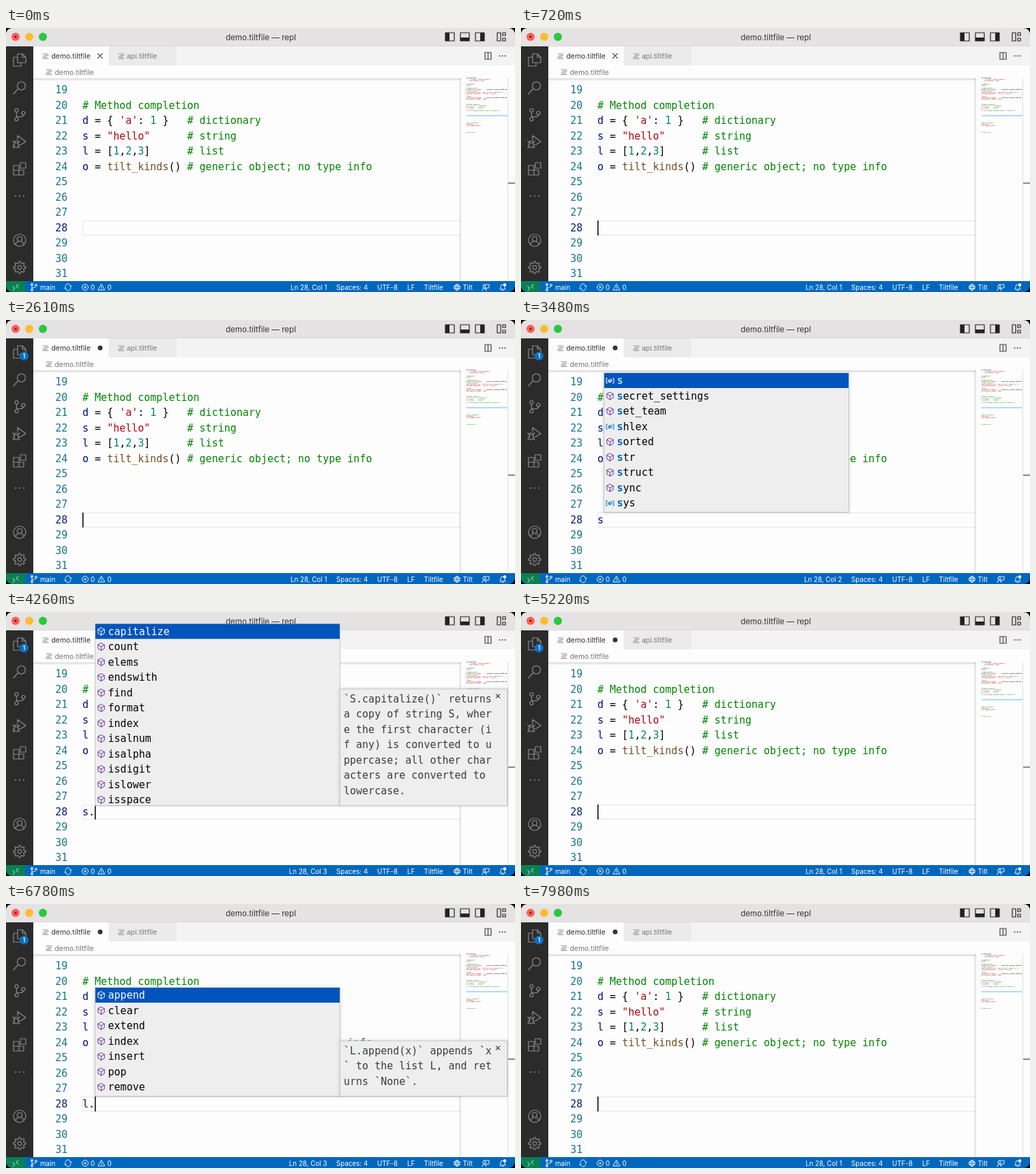
Write an HTML page that moves like this. It is 746 px wide and 388 px high and loops after 8 s.

```html
<!DOCTYPE html>
<html lang="en">
<head>
<meta charset="utf-8">
<title>Editor completion demo</title>
<style>
html, body { margin: 0; width: 100%; height: 100%; overflow: hidden; background: #000; }
svg { display: block; width: 746px; height: 388px; }
text { font: 10.4px Inter, sans-serif; white-space: pre; }
.code { font: 15px "DejaVu Sans Mono", monospace; }
.match { font-weight: bold; }
.mini { font: bold 1.7px "DejaVu Sans Mono", monospace; }
.status { font-size: 9.8px; fill: #fff; }
.title { font-size: 11.6px; fill: #333; text-anchor: middle; }
.end { text-anchor: end; }
.line { fill: none; stroke-width: 1.2; stroke-linejoin: round; stroke-linecap: round; }
</style>
</head>
<body>
<svg viewBox="0 0 746 388">
  <defs>
    <clipPath id="window"><rect width="746" height="388" rx="9"/></clipPath>
    <linearGradient id="fade" x2="0" y2="1"><stop stop-color="#000" stop-opacity=".15"/><stop offset="1" stop-color="#000" stop-opacity="0"/></linearGradient>
    <linearGradient id="side"><stop stop-color="#000" stop-opacity="0"/><stop offset="1" stop-color="#000" stop-opacity=".12"/></linearGradient>
    <filter id="shadow" x="-10%" y="-10%" width="120%" height="120%"><feDropShadow dx="0" dy="0" stdDeviation="2.5" flood-opacity=".16"/></filter>
  </defs>
  <g clip-path="url(#window)"><g id="base"></g><g id="live"></g></g>
</svg>
<script>
const LOOP = 8000, ROW = 22.5, CHAR = 9.03, CODE_X = 112, EDIT_LINE = 28;
const INK = "#000", GREEN = "#008500", RED = "#ad0a12", NUM = "#098658", NAME = "#001080", FUNC = "#735025";
const BLUE = "#0067bd", SELECTED = "#0054bb";

const rect = (x, y, w, h, fill, extra = "") => `<rect x="${x}" y="${y}" width="${w}" height="${h}" fill="${fill}" ${extra}/>`;
const text = (x, y, s, fill, cls = "") => `<text x="${x}" y="${y}" fill="${fill}" class="${cls}">${s}</text>`;
const path = (d, stroke, x = 0, y = 0, extra = "") =>
  `<path class="line" d="${d}" stroke="${stroke}" transform="translate(${x} ${y})" ${extra}/>`;
const dot = (x, y, r, fill) => `<circle cx="${x}" cy="${y}" r="${r}" fill="${fill}"/>`;
const ring = r => `M${-r} 0a${r} ${r} 0 1 0 ${2 * r} 0a${r} ${r} 0 1 0 ${-2 * r} 0`;
const cross = r => `M${-r} ${-r}L${r} ${r}M${r} ${-r}L${-r} ${r}`;
const spans = parts => parts.map(([fill, s]) => `<tspan fill="${fill}">${s}</tspan>`).join("");
const lineY = n => 91 + (n - 19) * ROW;

const source = {
  20: [[GREEN, "# Method completion"]],
  21: [[NAME, "d"], [INK, " = { "], [RED, "'a'"], [INK, ": "], [NUM, "1"], [INK, " }   "], [GREEN, "# dictionary"]],
  22: [[NAME, "s"], [INK, " = "], [RED, '"hello"'], [INK, "      "], [GREEN, "# string"]],
  23: [[NAME, "l"], [INK, " = ["], [NUM, "1"], [INK, ","], [NUM, "2"], [INK, ","], [NUM, "3"], [INK, "]      "], [GREEN, "# list"]],
  24: [[NAME, "o"], [INK, " = "], [FUNC, "tilt_kinds"], [INK, "() "], [GREEN, "# generic object; no type info"]],
};
const minimap = {
  1: [[NAME, "def hello(msg):"]],
  2: [[RED, '    """Formats a certain message."""']],
  3: [[FUNC, "    print"], [RED, "(message % (msg))"]],
  5: [[GREEN, "# Completion"]], 6: [[RED, "hello("]],
  8: [[GREEN, "# Signature help"]],
  9: [[RED, "docker_build('example', '.', "], [INK, "dockerfile_contents='FROM box')"]],
  10: [[GREEN, "# local_resource"]],
  11: [[RED, "local_resource('test', cmd='run tests', deps=['src'])"]],
  12: [[RED, "k8s_yaml('deployment', 'service', 'config')"]],
  14: [[GREEN, "# Hover"]],
  15: [[RED, "docker_build('example', '.', "], [INK, "dockerfile_contents='FROM box')"]],
  16: [[RED, "k8s_resource('example', 8000)"]],
  ...source,
  33: [[GREEN, "# Go to reference"]], 34: [[RED, "hello(msg)"]], 35: [[RED, "tilt_trigger('build')"]],
  40: [[GREEN, "# Live errors"]],
};

// Entries starting with "=" are variables, the others are functions.
const lists = {
  "d": "=d decode_json decode_yaml default_registry dict dir disable_snapshots docker_build docker_compose",
  "d.": "get items keys pop popitem setdefault update values",
  "s": "=s secret_settings set_team =shlex sorted str struct sync =sys",
  "s.": "capitalize count elems endswith find format index isalnum isalpha isdigit islower isspace",
  "l": "=l len link list listdir load load_dynamic local local_resource",
  "l.": "append clear extend index insert pop remove",
};
const docs = {
  "d.": "`D.get(key[, default])`|returns the dictionary v|alue corresponding to th|e given key. If the dict|ionary contains no such|value, `get` returns `No|ne`, or the value of the|optional `default` param|eter if present.",
  "s.": "`S.capitalize()` returns|a copy of string S, wher|e the first character (i|f any) is converted to u|ppercase; all other char|acters are converted to|lowercase.",
  "l.": "`L.append(x)` appends `x|` to the list L, and ret|urns `None`.",
};

// Times at which the edited line takes a new value.
const edits = [
  [-500, ""], [800, "d"], [1600, "d."], [2400, "d", "closed"], [2520, ""], [2880, "s"], [3820, "s."],
  [5070, "s", "closed"], [5200, ""], [6000, "l"], [6400, "l."], [7400, "l", "closed"], [7520, ""],
];

function fileIcon(x, y) {
  return path("M0 0h8M2 2.3h6M0 4.6h6M0 6.9h8", "#999", x, y, 'stroke-width="1"');
}

function activityBar() {
  const grey = "#8b8b8b", icon = (y, d) => path(d, grey, 20, y);
  return rect(0, 27, 40, 345, "#2b2b2b")
    + icon(47, "M-3-9h7l5 5v8h-12zM4-9v5h5M-3-4h-6v13h11v-5")
    + icon(87, "M-3 3l-6 7M-3.5-2a6 6 0 1 0 12 0a6 6 0 1 0-12 0")
    + icon(127, "M-7-6a2.5 2.5 0 1 0 5 0a2.5 2.5 0 1 0-5 0M-7 7a2.5 2.5 0 1 0 5 0a2.5 2.5 0 1 0-5 0M3-2a2.5 2.5 0 1 0 5 0a2.5 2.5 0 1 0-5 0M-4.500-3.500v8M5.500.5q0 3-5 3h-5")
    + icon(167, "M-3-3v-6L9 0L1 5M-8 3a3 4 0 1 1 6 0v2a3 4 0 1 1-6 0zM-8 2h6M-10-1l2 2M0-1l-2 2M-10 5h2M-2 5h2M-10 9l2-2M0 9l-2-2")
    + icon(207, "M-9-5h8v14h-8zM-9 2h15v7h-15M1-9h8v8h-8z")
    + [-6, 0, 6].map(x => dot(20 + x, 247, 1.1, grey)).join("")
    + icon(312, ring(9) + "M-3.500-2a3.500 3.500 0 1 0 7 0a3.500 3.500 0 1 0-7 0M-6 6.500q1-5 6-5t6 5")
    + icon(352, ring(2.8))
    + icon(352, Array.from({ length: 32 }, (_, i) => {
        const a = (i - .5) * Math.PI / 16, r = i % 4 < 2 ? 9 : 6.5;
        return `${i ? "L" : "M"}${(r * Math.cos(a)).toFixed(1)} ${(r * Math.sin(a)).toFixed(1)}`;
      }).join("") + "z");
}

function titleBar() {
  const frame = (x, fill) => path("M0 0h13v12h-13z", "#222", x, 7) + fill;
  return rect(0, 0, 746, 27, "#e4e2e3") + rect(0, 26.500, 746, .5, "#d2d0d1")
    + dot(14, 13, 6, "#fe5f57") + dot(14, 13, 1.8, "#8d1a14") + dot(34, 13, 6, "#febc2e") + dot(54, 13, 6, "#28c840")
    + text(373.500, 18, "demo.tiltfile — repl", "#333", "title")
    + frame(644, rect(644, 7, 6, 12, "#222")) + frame(666, rect(666, 14, 13, 5, "#222")) + frame(688, rect(695, 7, 6, 12, "#222"))
    + path("M0 0h5v12h-5zM8 0h4v4h-4zM8 8h4v4h-4z", "#222", 720, 7);
}

function statusBar() {
  const white = (d, x, y = 381) => path(d, "#fff", x, y, 'style="stroke-width:.9"');
  const label = (x, s) => text(x, 384.600, s, "#fff", "status");
  return rect(0, 372, 746, 16, BLUE) + rect(0, 372, 28, 16, "#0a8054")
    + white("M-4-1l3 2.500l-3 3M4-4l-3 2.500l3 3", 14)
    + white("M-3-5v9M3-2q0 3-6 3M-4.500-4a1.500 1.500 0 1 0 3 0a1.500 1.500 0 1 0-3 0M-4.500 4a1.500 1.500 0 1 0 3 0a1.500 1.500 0 1 0-3 0M1.500-3a1.500 1.500 0 1 0 3 0a1.500 1.500 0 1 0-3 0", 41)
    + label(50, "main")
    + white("M-4-1a4 4 0 0 1 8 0M4 1a4 4 0 0 1-8 0M2.500-2l1.500 1.500l1.500-1.500M-5.500 2l1.500-1.500l1.500 1.500", 91)
    + white(ring(4.5) + cross(1.7), 116) + label(124, "0")
    + white("M0-4.500l4.800 8.500h-9.600zM0-1.500v2.500M0 2.500v.2", 140) + label(148.500, "0")
    + label(484, "Spaces: 4") + label(544, "UTF-8") + label(588, "LF") + label(612.500, "Tiltfile")
    + white(ring(4.3) + "M-4-1.500h8M-4 1.500h8M0-4.300q-4 4.300 0 8.600M0-4.300q4 4.300 0 8.600", 661) + label(669.500, "Tilt")
    + white("M-3-4h8v5h-3l-2 2v-2M-4-1a2 2 0 1 0 4 0a2 2 0 1 0-4 0M-5 5q0-3.500 3-3.500t3 3.500", 703)
    + white("M-4 3h8l-1-2v-2a3 3 0 0 0-6 0v2zM-1 4.500h2", 728) + dot(731, 377.500, 2.2, "#fff");
}

function editor() {
  let out = rect(40, 55, 706, 317, "#fdfdfd")
    + rect(40, 27, 706, 28, "#f3f3f3") + rect(40, 27, 110, 28, "#fdfdfd") + rect(151, 27, 99, 28, "#ebebeb")
    + fileIcon(54, 38) + text(66.500, 45, "demo.tiltfile", "#333")
    + fileIcon(165, 38) + text(177, 45, "api.tiltfile", "#777")
    + path("M0 0h9v10h-9zM4.500 0v10", "#444", 702, 36)
    + [-4, 0, 4].map(x => dot(727.500 + x, 41, 1, "#444")).join("")
    + fileIcon(59, 61.500) + text(71.500, 69, "demo.tiltfile", "#777")
    + rect(40, 74, 627, 4, "url(#fade)")
    + rect(112.500, 283.500, 560, 21, "none", 'stroke="#e6e6e6"')
    + rect(667, 74, 79, 298, "#fdfdfd") + rect(663, 74, 4, 298, "url(#side)")
    + rect(675, 127.800, 60, 2, "#b0d8f7");
  for (let n = 19; n <= 31; n++) {
    out += text(90.300, lineY(n) + 5.300, n, n === EDIT_LINE ? "#0b216f" : "#1b7590", "code end");
    if (source[n]) out += text(CODE_X, lineY(n) + 5.300, spans(source[n]), INK, "code");
  }
  for (const n in minimap) out += text(675, 113.300 + (n - 20) * 2.05, spans(minimap[n]), INK, "mini");
  return out + rect(735, 74, 11, 298, "#fdfdfd") + rect(735, 74, 1, 298, "#dedede") + rect(736, 227, 10, 2, "#8a8a8a");
}

function itemIcon(isVariable, x, y, selected) {
  return isVariable
    ? path("M-4-3.500h-1.500v7h1.500M4-3.500h1.500v7h-1.500M-2.500-.5l3-1.700l2 1v2l-3 1.700l-2-1zM-2.500-.5l2 1l3-1.700M-.5.5v2", selected ? "#fff" : "#0878c8", x, y, 'style="stroke-width:1"')
    : path("M0-5.500l4.700 2.500v5.500l-4.700 2.800l-4.700-2.800v-5.500zM-4.700-3l4.700 2.700l4.700-2.700M0-.3v5.600", selected ? "#fff" : "#6f35a0", x, y, 'style="stroke-width:1"');
}

function popup(key, showDoc) {
  const items = lists[key].split(" "), tall = items.length >= 12;
  const left = CODE_X + key.length * CHAR + .5, bottom = tall ? 284.5 : 282.5;
  const top = tall ? 17.5 : bottom - 2 - items.length * ROW;
  const box = (x, y, w) => rect(x, y, w, bottom - y, "#eeeeee", 'stroke="#c4c4c4" filter="url(#shadow)"');
  let out = box(left, top, 359) + rect(left + .5, top, 358, ROW - .5, SELECTED);
  items.forEach((item, i) => {
    const selected = !i, isVariable = item[0] === "=", name = item.replace("=", "");
    const y = top + (i + .5) * ROW, typed = key.endsWith(".") ? 0 : key.length;
    out += itemIcon(isVariable, left + 9, y, selected)
      + text(left + 19, y + 5, `<tspan class="match" fill="${selected ? "#a5dcff" : BLUE}">${name.slice(0, typed)}</tspan>${name.slice(typed)}`, selected ? "#fff" : INK, "code");
  });
  // The last row of a full list is cut by the lower edge.
  if (tall) out = `<g clip-path="inset(0)">${out}</g>` + rect(left, bottom, 359, .8, "#c4c4c4");
  if (!showDoc) return out;
  const lines = docs[key].split("|"), docTop = bottom - lines.length * ROW - 14;
  return out + box(489.500, docTop, 245)
    + lines.map((s, i) => text(495, docTop + 19.800 + i * ROW, s, "#3c3c3c", "code")).join("")
    + path(cross(2.7), "#333", 721, docTop + 10.500);
}

function scene(t) {
  const [start, typed, closed] = edits.filter(e => e[0] <= t).pop();
  const age = t - start, modified = t >= edits[1][0];
  let out = modified
    ? dot(138, 41, 3.5, "#333") + dot(26.500, 53, 6.5, "#0a70c8")
      + `<text x="26.5" y="56.2" fill="#fff" text-anchor="middle" style="font-size:8.5px;font-weight:600">1</text>`
    : path(cross(3.3), "#333", 138, 41);
  out += text(470.500, 384.600, `Ln ${EDIT_LINE}, Col ${typed.length + 1}`, "#fff", "status end");
  if (typed) out += text(CODE_X, lineY(EDIT_LINE) + 5.300, spans([[NAME, typed[0]], [INK, typed.slice(1)]]), INK, "code");
  if (age % 1000 < 500) out += rect(CODE_X + typed.length * CHAR, 283, 1.5, 22, "#000");
  if (lists[typed] && !closed && age >= 90) out += popup(typed, docs[typed] && age >= 240);
  return out;
}

document.getElementById("base").innerHTML = titleBar() + activityBar() + editor() + statusBar();
const live = document.getElementById("live");
const began = performance.now();
let shown = "";
function draw() {
  const next = scene((performance.now() - began) % LOOP);
  if (next !== shown) live.innerHTML = shown = next;
  requestAnimationFrame(draw);
}
draw();
</script>
</body>
</html>
```
